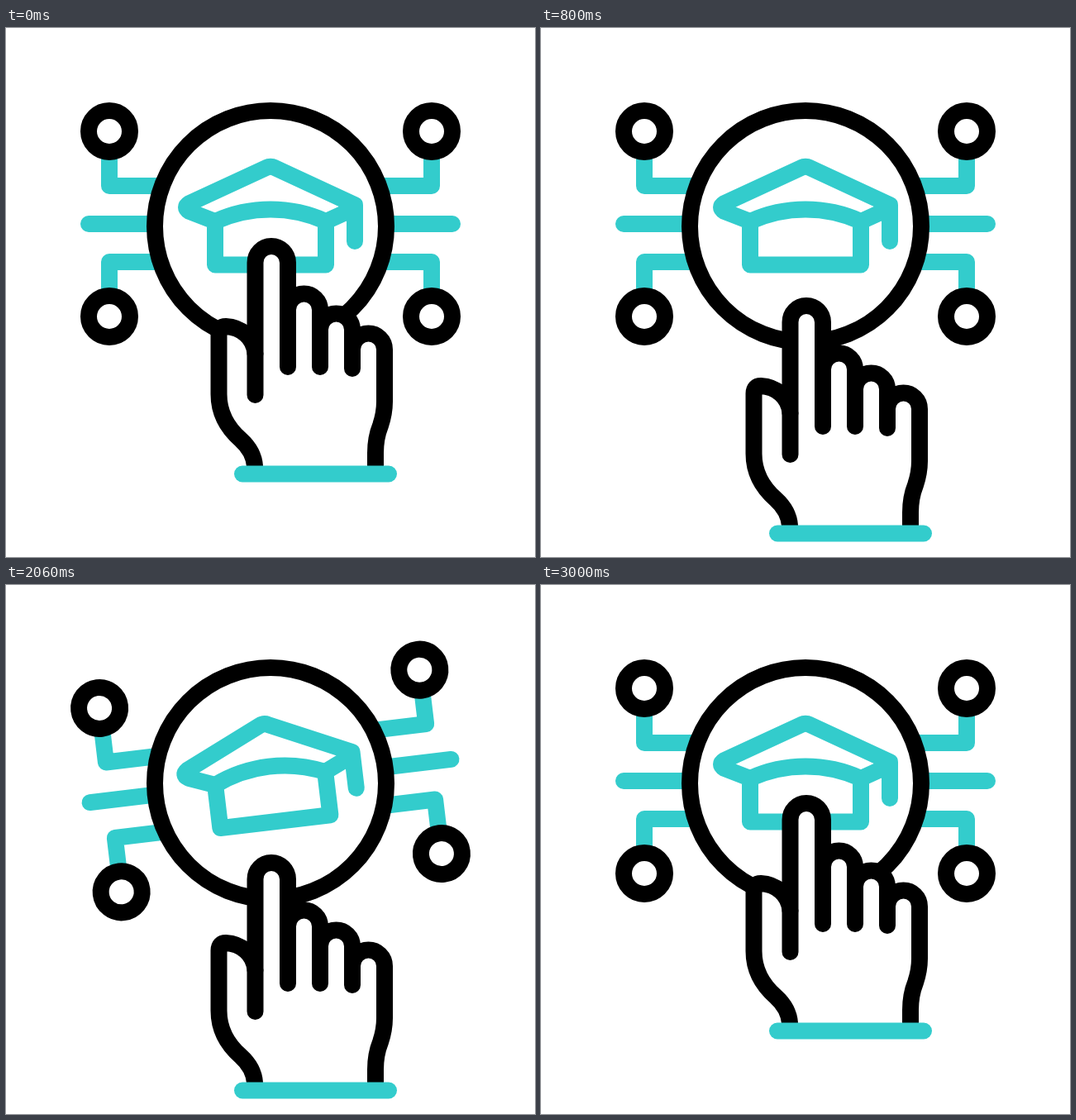
An HTML page with a canvas for the animation above (3200 ms loop, 640 by 640 pixels).

```html
<!DOCTYPE html>
<html lang="en">
<head>
<meta charset="utf-8">
<title>Online learning icon</title>
<style>
html, body { margin: 0; height: 100%; overflow: hidden; background: #fff; }
canvas { display: block; width: 100vw; height: 100vh; }
</style>
</head>
<body>
<canvas width="640" height="640"></canvas>
<script>
const ctx = document.querySelector('canvas').getContext('2d');
const LOOP = 3200, BEAT = 200, TEAL = '#33cccc', BLACK = '#000';
const DEG = Math.PI / 180;

const HAT = `M253,234 L222,222 Q214,217 222,212 L315,169 Q320,166.5 325,169 L422,214 L422,258
  M253,234 C275,224 297,219.5 320,219.5 C343,219.5 365,224 387,234 L420,219
  M253,236 L253,286.5 L387,286.5 L387,236`;
const PALM = `M301,530 C300,517 294,507 284,498 C268,484 257.5,466 257.5,443
  L257.5,370 Q257.5,361 266,361 C284,362 300,374 301.5,394
  L301.5,284 C301.5,273 310,264 321,264 C332,264 341,273 341,284
  L341,341 C341,330 350,321.5 360.5,321.5 C371,321.5 380,330 380,341
  L380,365 C380,354 389,345.5 399.5,345.5 C410,345.5 419,354 419,365
  L419,389 C419,378 428,369.5 438.5,369.5 C449,369.5 458,378 458,389
  L458,452 C458,463 456,472 453,481 C449,491 447,502 447,514 L447,530`;
const FINGERS = 'M301.5,394 L301.5,444 M341,341 L341,410 M380,365 L380,410 M419,389 L419,412';
const CUFF = 'M286,539.5 L463,539.5';

// Connectors on the left half: [y, x where the signal starts, node y or null]
const WIRES = [[191, 180, 125], [237, 181, null], [283, 177, 349]];
// Click marks: inner x, y, outer x, y
const MARKS = [[277, 220, 243, 195], [305, 207, 292, 166], [332, 203, 354, 166]];

const ease = u => u * u * (3 - 2 * u);
const mix = (a, b, u) => a + (b - a) * u;

// Eased run through values, one per beat, beginning at start
function keys(t, start, ...vals) {
  const p = Math.min(Math.max((t - start) / BEAT, 0), vals.length - 1);
  const i = Math.min(Math.floor(p), vals.length - 2);
  return mix(vals[i], vals[i + 1], ease(p - i));
}

const shape = (d, map) => new Path2D(d.replace(/([\d.]+),([\d.]+)/g, (_, x, y) => map(+x, +y).join()));

function stroke(path, color, width = 20) {
  ctx.strokeStyle = color;
  ctx.lineWidth = width;
  ctx.stroke(path);
}

function disc(x, y, r) {
  const p = new Path2D();
  p.arc(x, y, r, 0, 7);
  ctx.fill(p);
  stroke(p, BLACK);
}

function spin(deg, draw) {
  ctx.save();
  ctx.translate(320, 237);
  ctx.rotate(deg * DEG);
  ctx.translate(-320, -237);
  draw();
  ctx.restore();
}

function wire(y, x, nodeY) {
  return new Path2D(`M${x},${y}` + (nodeY ? `H125V${nodeY}` : 'H100'));
}

function network(t) {
  const head = keys(t, 1000, 0, 1), tail = keys(t, 1400, 0, 1);
  const r = 25 + keys(t, 1200, 0, 20.7, 0);
  for (const flip of [false, true]) {
    ctx.save();
    if (flip) ctx.transform(-1, 0, 0, 1, 640, 0);
    for (const [y, x, nodeY] of WIRES) {
      stroke(wire(y, 230, nodeY), TEAL);
      if (head > tail) {
        const len = nodeY ? x - 125 + Math.abs(nodeY - y) : x - 100;
        ctx.setLineDash([len * (head - tail), 999]);
        ctx.lineDashOffset = -len * tail;
        stroke(wire(y, x, nodeY), BLACK, 22);
        ctx.setLineDash([]);
      }
      if (nodeY) disc(125, nodeY, r);
    }
    ctx.restore();
  }
}

function marks(t) {
  const head = keys(t, 200, 0, 1), tail = keys(t, 400, 0, 1);
  if (head <= tail) return;
  for (const [x, y, ox, oy] of MARKS) {
    const at = u => `${mix(x, ox, u)},${mix(y, oy, u)}`;
    stroke(new Path2D(`M${at(tail)}L${at(head)}`), BLACK);
  }
}

// Fingers tilt and shrink around the fingertip, the wrist follows the cuff
function handMap(press, drop) {
  const c = Math.cos(12.8 * press * DEG), s = Math.sin(12.8 * press * DEG);
  const turn = (x, y, cx, cy, k, dx, dy) => {
    const u = (x - cx) * k, v = (y - cy) * k;
    return [cx + dx * press + u * c + v * s, cy + dy * press - u * s + v * c];
  };
  return (x, y) => {
    const a = turn(x, y, 321, 284, 1 - .142 * press, -4.3, -27);
    const b = turn(x, y, 374.5, 539.5, 1, 60, -40);
    const w = Math.min(Math.max((y - 440) / 90, 0), 1);
    return [mix(a[0], b[0], w), mix(a[1], b[1], w) + drop];
  };
}

function hand(t, press) {
  const drop = t < 2000 ? keys(t, 600, 0, 72) : keys(t, 2800, 72, 0);
  const map = handMap(press, drop);
  const palm = shape(PALM, map);
  ctx.fill(palm);
  stroke(palm, BLACK);
  stroke(shape(FINGERS, map), BLACK);
  stroke(shape(CUFF, map), TEAL);
}

function draw(now) {
  const t = Math.floor(now % LOOP / 20) * 20;
  const press = keys(t, 0, 0, 1, 1, 0);
  const tilt = keys(t, 1600, 0, 12, -12, 12, -12, 12, 0);
  const size = 1 - .272 * press;

  ctx.fillStyle = '#fff';
  ctx.fillRect(0, 0, 640, 640);
  ctx.lineCap = ctx.lineJoin = 'round';

  spin(tilt, () => network(t));
  disc(320, 240, 140 * size);
  const hat = shape(HAT, (x, y) => [320 + (x - 320) * size, 240 + (y - 240) * size]);
  spin(tilt, () => stroke(hat, TEAL));
  marks(t);
  hand(t, press);
}

const begin = performance.now();
function tick() {
  draw(performance.now() - begin);
  requestAnimationFrame(tick);
}
tick();
</script>
</body>
</html>
```
